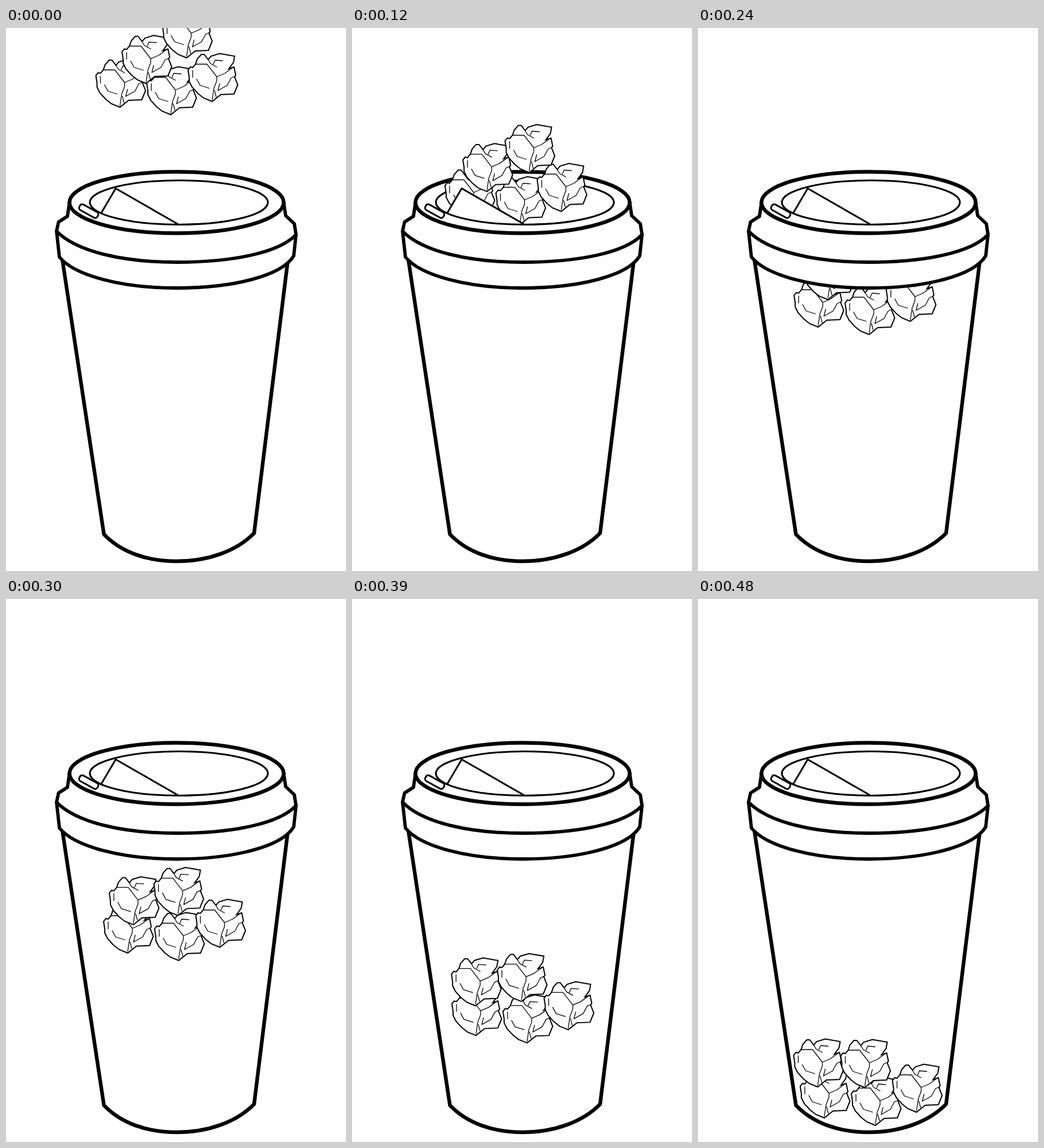
An HTML page that plays this animation: 592 by 946 pixels, repeating every 510 ms.

```html
<!DOCTYPE html>
<html lang="en">
<head>
<meta charset="utf-8">
<title>Paper balls falling into a cup</title>
<style>
html, body { margin: 0; width: 100%; height: 100%; overflow: hidden; background: #fff; }
svg { display: block; width: 100vw; height: 100vh; }
path, ellipse, rect { fill: none; stroke: #000; stroke-linejoin: round; stroke-linecap: round; }
.thick { stroke-width: 6.4; }
.lid { stroke-width: 5.8; }
.thin { stroke-width: 3; }
.cover { fill: #fff; stroke: none; }
.paper { fill: #fff; stroke-width: 2; stroke-linejoin: miter; }
.crease { stroke-width: 1.3; }
</style>
</head>
<body>
<svg viewBox="0 0 592 946">
  <defs>
    <!-- crumpled paper, origin at its lowest tip -->
    <g id="ball">
      <path class="paper" d="M0 0 L-15 -6 L-25 -14 L-35 -25 L-40 -35 L-40 -42 L-42 -55 L-38 -60 L-34 -59 L-29 -65 L-26 -74 L-19 -82 L-14 -82 L-7 -73 L-2 -79 L13 -83.500 L39 -79 L37 -68 L29 -57 L38 -60 L41 -46 L39 -43 L44.500 -29 L38 -13 L15 -12 Z"/>
      <path class="crease" d="M-29 -65 L-9 -65 L8 -43 L22 -49 L37 -60 M8 -43 L8 -36 L3 -23 L0 -3 M-7 -73 L-3 -66 L8 -60 M2 -65 L5 -72 L18 -71 M-34 -54 L-34 -42 M-27 -39 L-21 -28 L-5 -23 M13 -31 L10 -19 L26 -28 L33 -41 L40 -44 M4 -19 L7 -8"/>
    </g>
  </defs>

  <ellipse class="thick" cx="297" cy="304" rx="186.500" ry="53.500"/>
  <ellipse class="thin" cx="301" cy="304" rx="155" ry="38.500"/>

  <g id="balls"></g>

  <path class="cover" d="M146 304 A155 38.500 0 0 0 456 304 L484 304 L487 327 L502 341 L505 359 L501 397 C480 432 395 453 297 453 C200 453 119 431 93 399 L88 355 L92 338 L107 327 L110 304 Z"/>
  <path class="cover" d="M166 322 L191 279.500 L299 341.500 A155 38.500 0 0 1 166 322 Z"/>
  <path class="thin" d="M146 304 A155 38.500 0 0 0 456 304 M166 322 L191 279.500 L299 341.500"/>
  <rect class="thin" x="-18" y="-5.500" width="36" height="11" rx="4.500" transform="translate(144 319) rotate(29)"/>

  <path class="thick" d="M110.500 304 A186.500 53.500 0 0 0 483.500 304"/>
  <path class="lid" d="M111 301 L107 328 L91.500 338 L88 354 L93 399 C119 431 200 453 297 453 C395 453 480 432 501 397 L505 360 L502 341 L487 327 L483 301"/>
  <path class="lid" d="M88 354 C122 389 202 408 297 408 C393 408 475 392 505 360"/>
  <path class="thick" d="M98.500 406 L170.500 882 C200 913 245 929 297 929 C352 929 402 911 432 880 L490 411"/>
</svg>
<script>
const LOOP = 510, STEP = 30, FALL = 480;

// tip positions at the start and end of the fall, back to front
const drops = [
  { from: [198.5, 138], to: [220, 904] },
  { from: [287, 151], to: [309, 917] },
  { from: [359, 128], to: [380.5, 894] },
  { from: [244, 96.5], to: [208.5, 850] },
  { from: [314.5, 52], to: [290.5, 851] }
];

const layer = document.getElementById("balls");
for (const drop of drops) {
  drop.node = document.createElementNS(layer.namespaceURI, "use");
  drop.node.setAttribute("href", "#ball");
  layer.append(drop.node);
}

const mix = (a, b, k) => a + (b - a) * k;

function draw(time) {
  const k = Math.floor((time % LOOP) / STEP) * STEP / FALL;
  for (const { node, from, to } of drops) {
    const [x, y] = from.map((v, i) => mix(v, to[i], k));
    node.setAttribute("transform", `translate(${x} ${y})`);
  }
}

let start;
function tick(now) {
  start ??= now;
  draw(Math.max(0, now - start));
  requestAnimationFrame(tick);
}
draw(0);
requestAnimationFrame(tick);
</script>
</body>
</html>
```
